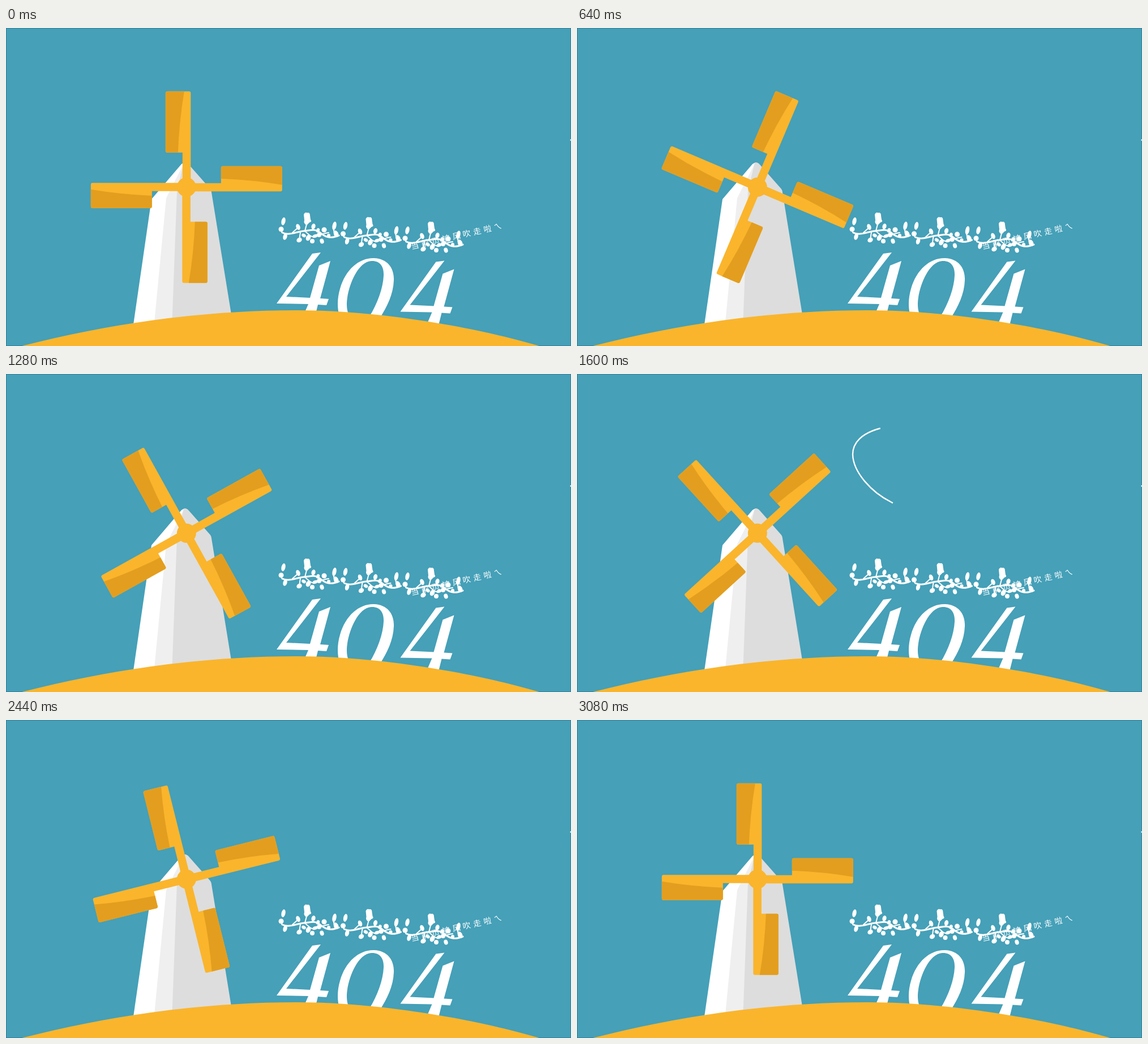
These frames come from a looping animation (998x561 px, 3.16 s). An HTML page:

```html
<!DOCTYPE html>
<html lang="zh">
<head>
<meta charset="utf-8">
<title>404</title>
<style>
html, body { margin: 0; width: 100%; height: 100%; overflow: hidden; background: #45a0b8; }
svg { display: block; width: 998px; height: 561px; }
.note { font: 300 14px "Noto Sans CJK SC", "Noto Sans CJK", sans-serif; letter-spacing: 4.8px; }
</style>
</head>
<body>
<svg viewBox="0 0 998 561">
  <defs>
    <g id="blade">
      <path fill="#fab52c" d="M-34-169H4.5Q7.5-169 7.5-166V0H-7V-61H-34Q-37-61-37-64V-166Q-37-169-34-169Z"/>
      <path fill="#e39e1f" d="M-34-169H-4Q-13-115-15-61H-34Q-37-61-37-64V-166Q-37-169-34-169Z"/>
    </g>
    <path id="four" d="M541 398L556 396L495 474L537 476L553 419L573 411L555 477L570 478L566 489L551 488L546 508H525L534 487L478 486Z"/>
    <g id="vine">
      <g fill="none" stroke="#fff" stroke-linecap="round">
        <path stroke-width="3" d="M488 361C500 367 514 359 527 358S545 353 556 362S576 371 588 366"/>
        <path stroke-width="2" d="M528 358L532 342M506 361L516 352M527 358C534 362 537 370 546 368S560 362 570 361M520 360L518 374M540 357L544 350M487 360V354M581 367L578 352"/>
      </g>
      <path d="M526 329Q528 324 532 326Q537 325 537 331L538 338Q541 342 536 343L531 348Q525 345 527 339Z"/>
    </g>
  </defs>

  <rect width="998" height="561" fill="#45a0b8"/>
  <rect x=".5" y=".5" width="997" height="560" fill="none" stroke="#337f96"/>

  <path fill="#fff" d="M224 530L257 302L310 240Q316 235 322 240V530Z"/>
  <path fill="#efefef" d="M314 239L283 300L261 530H300L322 240Z"/>
  <path fill="#ddd" d="M314 237.500Q319 236 323 241L361 284Q363 287 363 290L402 530H293L302 287Z"/>

  <g transform="translate(318.800 280.800)">
    <g id="sails">
      <use href="#blade"/>
      <use href="#blade" transform="rotate(90)"/>
      <use href="#blade" transform="rotate(180)"/>
      <use href="#blade" transform="rotate(270)"/>
      <circle r="17" fill="#fab52c"/>
    </g>
  </g>

  <g fill="#fff">
    <use href="#vine"/>
    <use href="#vine" x="109.500" y="8"/>
    <use href="#vine" x="219" y="16"/>
    <text class="note" transform="translate(716.500 390.500) rotate(-13)">当前页被风吹走啦ㄟ</text>
    <use href="#four"/>
    <use href="#four" x="218.500" y="14.500"/>
    <path fill-rule="evenodd" d="M650 406C675 407 686 425 685 445C684 475 668 500 655 520H595C584 505 584 480 590 460C600 425 625 405 650 406ZM645 411C622 413 607 450 603 475C600 495 604 505 610 515H638C655 490 666 460 667 437C668 420 660 410 645 411Z"/>
    <circle cx="998" cy="197.500" r="1.500"/>
  </g>

  <path id="wind" fill="none" stroke="#fff" stroke-width="2.400" d="M1012-6C900 40 650 70 543 94C505 102 487 120 487 142C488 173 519 208 555 226C640 275 800 330 800 430C800 490 750 507 710 507C640 507 600 440 640 370C690 290 800 259 881 235Q940 219 998 197"/>
  <path fill="#fab52c" d="M28 561C190 520 350 498 515 498C660 498 830 528 942 561Z"/>
</svg>
<script>
const $ = id => document.getElementById(id);
const sails = $('sails'), wind = $('wind'), length = wind.getTotalLength();

// Leaves and buds: x, y, rx, ry, tilt
const leaves = [
  [490, 341, 3.5, 7, 12], [486, 355, 4.5, 4.5, 0], [493, 368, 3.5, 6, 15],
  [516, 351, 3.5, 5.5, -20], [518, 374, 5, 4, -35], [526, 366, 4, 3, 30],
  [534, 370, 4, 5.5, 25], [541, 376, 4, 4, 0], [546, 367, 5, 3, -20],
  [553, 365, 4, 4, 0], [558, 376, 3.5, 4.5, -20], [543, 350, 3.5, 5, 15],
  [551, 357, 3, 4, 20], [562, 356, 4.5, 4.5, 0], [570, 366, 3, 3, 0],
  [580, 349, 3.5, 7.5, 12], [583, 363, 4, 6, -25]
];
$('vine').insertAdjacentHTML('beforeend', leaves.map(([x, y, rx, ry, tilt]) =>
  `<ellipse rx="${rx}" ry="${ry}" transform="translate(${x} ${y}) rotate(${tilt})"/>`).join(''));

// Sail turn: step, angle, speed per step
const turn = [
  [0, 0, 6.8], [16, 113, 7.5], [32, 241, 8.6], [40, 317.6, 11.5],
  [48, 428.1, 14.8], [61, 616, 11.5], [77, 720, 3]
];

function angleAt(n) {
  const i = Math.max(1, turn.findIndex(k => k[0] >= n));
  const [n0, a0, v0] = turn[i - 1], [n1, a1, v1] = turn[i];
  const d = n1 - n0, u = (n - n0) / d, w = 1 - u;
  return a0 * w * w * (1 + 2 * u) + a1 * u * u * (3 - 2 * u) + d * u * w * (v0 * w - v1 * u);
}

function ease(t, start, span) {
  const u = Math.min(1, Math.max(0, (t - start) / span));
  return u < .5 ? 4 * u ** 3 : 1 - 4 * (1 - u) ** 3;
}

function draw(now) {
  const step = Math.min(77, Math.floor(now % 3160 / 40)), t = step * 40;
  sails.setAttribute('transform', `rotate(${angleAt(step)})`);
  const head = ease(t, 1232, 800) * length, tail = ease(t, 1190, 994) * length;
  const shown = head > tail + 1;
  wind.style.visibility = shown ? 'visible' : 'hidden';
  if (shown) wind.setAttribute('stroke-dasharray', `0 ${tail} ${head - tail} ${length * 2}`);
}

const begin = performance.now();
function loop() {
  draw(performance.now() - begin);
  requestAnimationFrame(loop);
}
loop();
</script>
</body>
</html>
```
